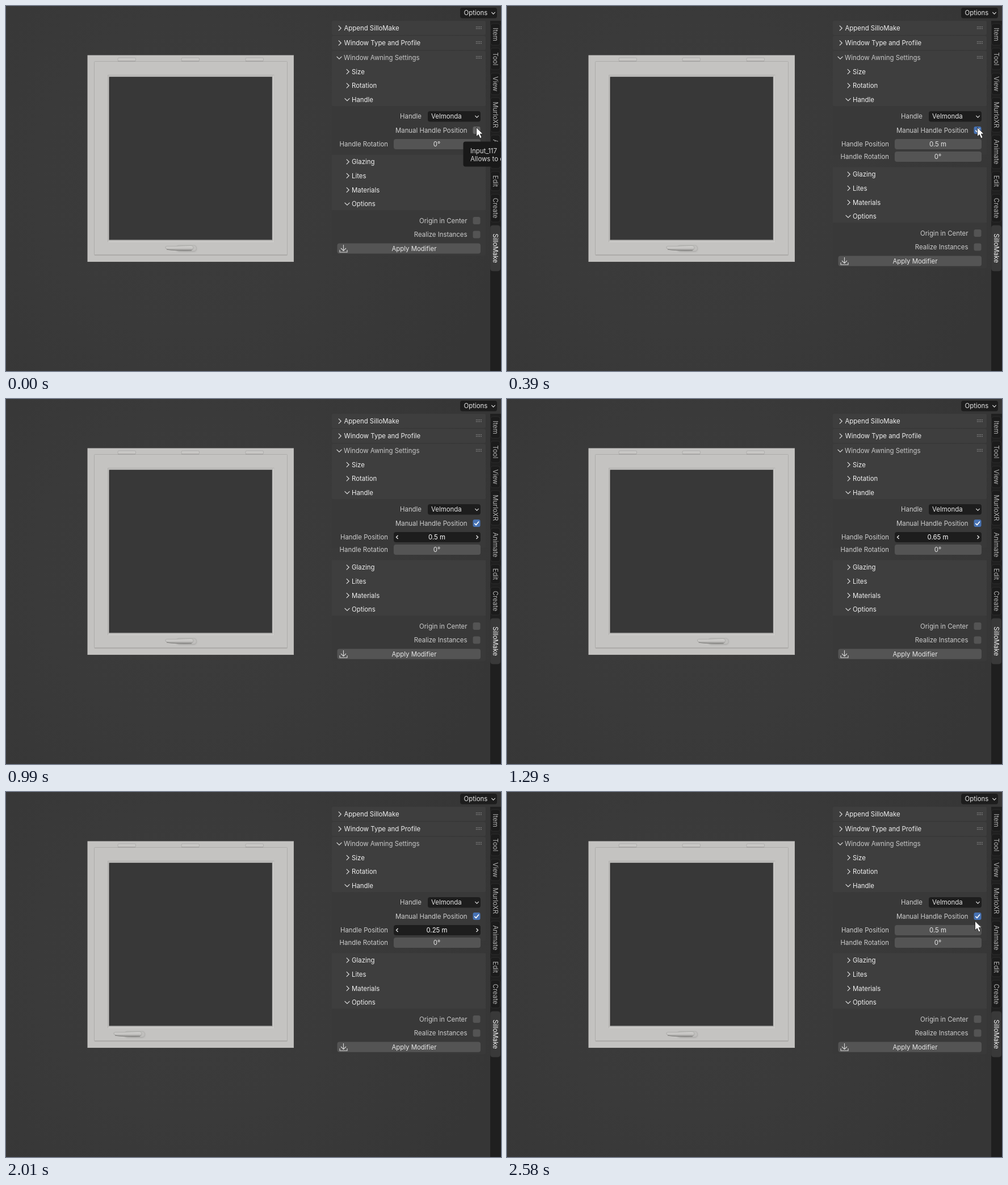
Animation, 872 px wide and 642 px high, one loop 2.64 s. Source, as an HTML page:

```html
<!DOCTYPE html>
<html lang="en">
<head>
<meta charset="utf-8">
<title>Window handle position</title>
<style>
  html, body { margin: 0; width: 100%; height: 100%; overflow: hidden; background: #393939; }
  svg { display: block; width: 872px; height: 642px; }
  text { font: 400 11.4px Inter, "Open Sans", sans-serif; white-space: pre; }
</style>
</head>
<body>
<svg id="stage" viewBox="0 0 872 642" xmlns="http://www.w3.org/2000/svg">
  <defs>
    <radialGradient id="view" gradientUnits="userSpaceOnUse" cx="330" cy="300" r="560">
      <stop offset="0" stop-color="#3c3c3c"/>
      <stop offset=".5" stop-color="#3a3a3a"/>
      <stop offset="1" stop-color="#363636"/>
    </radialGradient>
    <linearGradient id="bar" x2="0" y2="1">
      <stop offset="0" stop-color="#d2d1cf"/>
      <stop offset=".55" stop-color="#c3c2c0"/>
      <stop offset="1" stop-color="#8b8a88"/>
    </linearGradient>
    <filter id="soft" x="-20%" y="-60%" width="140%" height="220%">
      <feGaussianBlur stdDeviation="1"/>
    </filter>
  </defs>
</svg>
<script>
const LOOP = 2640, STEP = 30, SHIFT = 22;
const LABEL = '#cdcdcd', TITLE = '#f0f0f0', FIELD = '#545454', DARK = '#1d1d1d';
const stage = document.getElementById('stage');

function el(parent, tag, attrs, content) {
  const node = document.createElementNS(stage.namespaceURI, tag);
  for (const key in attrs) node.setAttribute(key, attrs[key]);
  if (content !== undefined) node.textContent = content;
  parent.append(node);
  return node;
}
const group = (parent = stage) => el(parent, 'g', {});
const rect = (parent, x, y, width, height, fill, rx = 0, more = {}) =>
  el(parent, 'rect', { x, y, width, height, fill, rx, ...more });
const line = (parent, d, stroke, width = 1, more = {}) =>
  el(parent, 'path', { d, stroke, 'stroke-width': width, fill: 'none', ...more });
// y is the middle of the text line
const text = (parent, x, y, content, fill = LABEL, anchor = 'start') =>
  el(parent, 'text', { x, y: y + 4, fill, 'text-anchor': anchor }, content);
const show = (node, on) => node.setAttribute('visibility', on ? 'visible' : 'hidden');
const move = (node, x, y) => node.setAttribute('transform', `translate(${x} ${y})`);

function chevron(parent, x, y, open, size = 4) {
  const s = size;
  line(parent, open ? `M${x - s} ${y - s / 2}l${s} ${s}l${s} ${-s}`
                    : `M${x - s / 2} ${y - s}l${s} ${s}l${-s} ${s}`, '#dcdcdc', 1.2);
}
function subpanel(parent, y, title, open) {
  chevron(parent, open ? 601 : 602, y, open, 4.4);
  text(parent, 609, y, title, TITLE);
}
function checkbox(parent, y, title) {
  text(parent, 812.5, y, title, LABEL, 'end');
  return rect(parent, 822.5, y - 6.5, 13, 13, FIELD, 3);
}
function field(parent, y, title, value) {
  text(parent, 673, y, title, LABEL, 'end');
  const box = rect(parent, 683, y - 9, 153, 18, FIELD, 4);
  return { box, value: text(parent, 759, y, value, '#e6e6e6', 'middle') };
}

function drawWindow() {
  const g = group();
  rect(g, 143.5, 86.5, 363.5, 363.5, '#c3c2c0');
  line(g, 'M144 449.5H506.5V87', '#b9b8b6');
  rect(g, 155.5, 97.5, 340, 340.5, '#c4c3c1', 1, { stroke: '#adacaa' });
  line(g, 'M156 438H495.5', '#a19f9d', 1.2);
  rect(g, 179.5, 121.5, 292.5, 293, '#bebdbb', 0, { stroke: '#b1b0ae' });
  line(g, 'M180 414.5H471.5V122', '#cfcecc', 1.4);
  rect(g, 182, 125, 286.5, 286, '#383838', 0, { stroke: '#4b4a4a' });
  line(g, 'M182.5 411V125.5H468', '#2d2d2d');
  for (const x of [197, 309, 422]) {
    rect(g, x, 91, 31.5, 6, '#c8c7c5', 2, { stroke: '#aaa9a7', 'stroke-width': .8 });
    line(g, `M${x} 97H${x + 31}`, '#9c9b99');
  }
}

function drawHandle() {
  const g = group();
  rect(g, -9, -4.5, 36, 11, '#989795', 5, { opacity: .5, filter: 'url(#soft)' });
  rect(g, -9, -5, 35.5, 10, '#c0bfbd', 4.5, { stroke: '#aeadab', 'stroke-width': .7 });
  el(g, 'path', {
    d: 'M-26 -3.5Q-29 -3 -28 0Q-25 3 -12 3.5Q5 5 17 4Q21 3 21 -.5Q21 -4.5 16 -4.5Q2 -4 -10 -3.5Z',
    fill: 'url(#bar)', stroke: '#a3a2a0', 'stroke-width': .7
  });
  line(g, 'M-26 2.2Q-12 4.4 18 4', '#7f7e7c', 1);
  return g;
}

function drawPanel() {
  const g = group();
  rect(g, 574, 26, 271, 25, '#3e3e3e', 3);
  rect(g, 574, 52.5, 271, 25, '#3e3e3e', 3);
  rect(g, 574, 79, 271, 97.5, '#3e3e3e', 3);
  rect(g, 574, 176.5, 271, 85, '#393939');
  [[39, 'Append SilloMake'], [65, 'Window Type and Profile'], [91, 'Window Awning Settings']]
    .forEach(([y, title], i) => {
      const open = i === 2;
      chevron(g, open ? 587 : 588, y, open, 4.4);
      text(g, open ? 595 : 595.5, y, title, open ? '#c8c8c8' : TITLE);
      for (let k = 0; k < 8; k++)
        rect(g, 828 + k % 4 * 2.8, y - 3 + (k >> 2) * 3, 1.4, 1.4, '#8a8a8a');
    });
  subpanel(g, 115.5, 'Size');
  subpanel(g, 140, 'Rotation');
  subpanel(g, 164.5, 'Handle', true);

  text(g, 732, 194, 'Handle', LABEL, 'end');
  rect(g, 743, 185, 93, 18.5, DARK, 4);
  text(g, 749, 194, 'Velmonda', '#e6e6e6');
  chevron(g, 829.5, 194.5, true, 3.2);
  const box = checkbox(g, 218.5, 'Manual Handle Position');
  const tick = line(g, 'M825.3 218.8L828 221.6L833 215.4', '#fff', 1.6);

  const posRow = group(g);
  const pos = field(posRow, 243, 'Handle Position', '0.5 m');
  const arrows = group(posRow);
  line(arrows, 'M690.5 240l-3 3l3 3M828.5 240l3 3l-3 3', '#eee', 1.3);

  const lower = group(g);
  field(lower, 243, 'Handle Rotation', '0°');
  rect(lower, 574, 261.5, 271, 97.5, '#3e3e3e');
  rect(lower, 574, 359, 271, 80, '#393939', 3);
  subpanel(lower, 274, 'Glazing');
  subpanel(lower, 298.5, 'Lites');
  subpanel(lower, 323.5, 'Materials');
  subpanel(lower, 348, 'Options', true);
  checkbox(lower, 377.5, 'Origin in Center');
  checkbox(lower, 402, 'Realize Instances');
  rect(lower, 583.5, 417.5, 252.5, 18, FIELD, 4);
  text(lower, 719, 426.5, 'Apply Modifier', '#e6e6e6', 'middle');
  line(lower, 'M594.5 420V430M590 426l4.5 4.5l4.5 -4.5M588 429V433H601V429', '#d8d8d8', 1.1);
  return { box, tick, posRow, pos, arrows, lower };
}

function drawTabs() {
  const g = group();
  rect(g, 853, 26, 19, 616, '#1f1f1f');
  [['Item', 31, 69], ['Tool', 74, 112], ['View', 118, 156], ['MurloXR', 161, 222],
   ['Animate', 227, 286], ['Edit', 291, 325], ['Create', 331, 380], ['SilloMake', 386, 466]]
    .forEach(([name, top, bottom], i) => {
      const active = i === 7;
      rect(g, 853.5, top, 17, bottom - top, active ? '#393939' : '#1b1b1b', 4,
        { stroke: active ? '#393939' : '#303030', 'stroke-width': .8 });
      el(g, 'text', {
        transform: `translate(857.5 ${(top + bottom) / 2}) rotate(90)`,
        'text-anchor': 'middle', fill: active ? '#f4f4f4' : '#b4b4b4'
      }, name);
    });
}

rect(stage, 0, 0, 872, 642, 'url(#view)');
drawWindow();
const handle = drawHandle();
const panel = drawPanel();
drawTabs();
rect(stage, 800, 3, 65, 18.5, DARK, 4);
text(stage, 806.5, 12, 'Options', '#e6e6e6');
chevron(stage, 858.5, 12.5, true, 3.2);

const tip = group();
rect(tip, 805.5, 238.5, 80, 44, '#191919', 4);
text(tip, 818, 255, 'Input_117', '#dedede');
text(tip, 818, 268.5, 'Allows to control', '#dedede');

const cursor = group();
el(cursor, 'path', {
  d: 'M0 0V16.2L3.8 12.8L6.6 19.2L9.6 17.8L6.8 11.6H11.6Z',
  fill: '#fff', stroke: '#222', 'stroke-width': .9, 'stroke-linejoin': 'round'
});

// Rows of [ms, ...values], eased between neighbours
const CURSOR = [[0, 828.5, 213.5], [600, 828.5, 213.5], [720, 826.5, 217],
                [900, 822, 240], [2310, 822, 240], [2580, 824.5, 227]];
const METRES = [[1020, .5], [1560, .79], [1650, .83], [1890, .1], [2010, .25], [2160, .5]];
const CLICK = 90, PRESS = 930, RELEASE = 2280;

function sample(rows, t) {
  const i = rows.findIndex(row => row[0] > t);
  if (i === 0) return rows[0].slice(1);
  if (i < 0) return rows[rows.length - 1].slice(1);
  const a = rows[i - 1], b = rows[i];
  const p = (t - a[0]) / (b[0] - a[0]), e = p * p * (3 - 2 * p);
  return a.slice(1).map((v, k) => v + (b[k + 1] - v) * e);
}

function draw(t) {
  const checked = t >= CLICK, dragging = t >= PRESS && t < RELEASE;
  const [x, y] = sample(CURSOR, t);
  const metres = Math.round(sample(METRES, t)[0] * 100) / 100;
  const hover = !dragging && y > 234;

  show(tip, !checked);
  show(panel.tick, checked);
  show(panel.posRow, checked);
  show(panel.arrows, dragging || (checked && hover));
  panel.box.setAttribute('fill', checked ? '#4772b3' : y < 226 ? '#646464' : FIELD);
  panel.pos.box.setAttribute('fill', dragging ? DARK : hover ? '#656565' : FIELD);
  panel.pos.value.setAttribute('fill', dragging ? '#fff' : '#e6e6e6');
  panel.pos.value.textContent = metres + ' m';
  move(panel.lower, 0, checked ? SHIFT : 0);
  move(handle, 309 + (metres - .5) * 364, 426);
  show(cursor, !dragging);
  move(cursor, x, y);
}

const start = performance.now();
function tick(now) {
  const t = Math.max(0, now - start) % LOOP;
  draw(Math.min(Math.floor(t / STEP) * STEP, 2580));
  requestAnimationFrame(tick);
}
draw(0);
requestAnimationFrame(tick);
</script>
</body>
</html>
```
